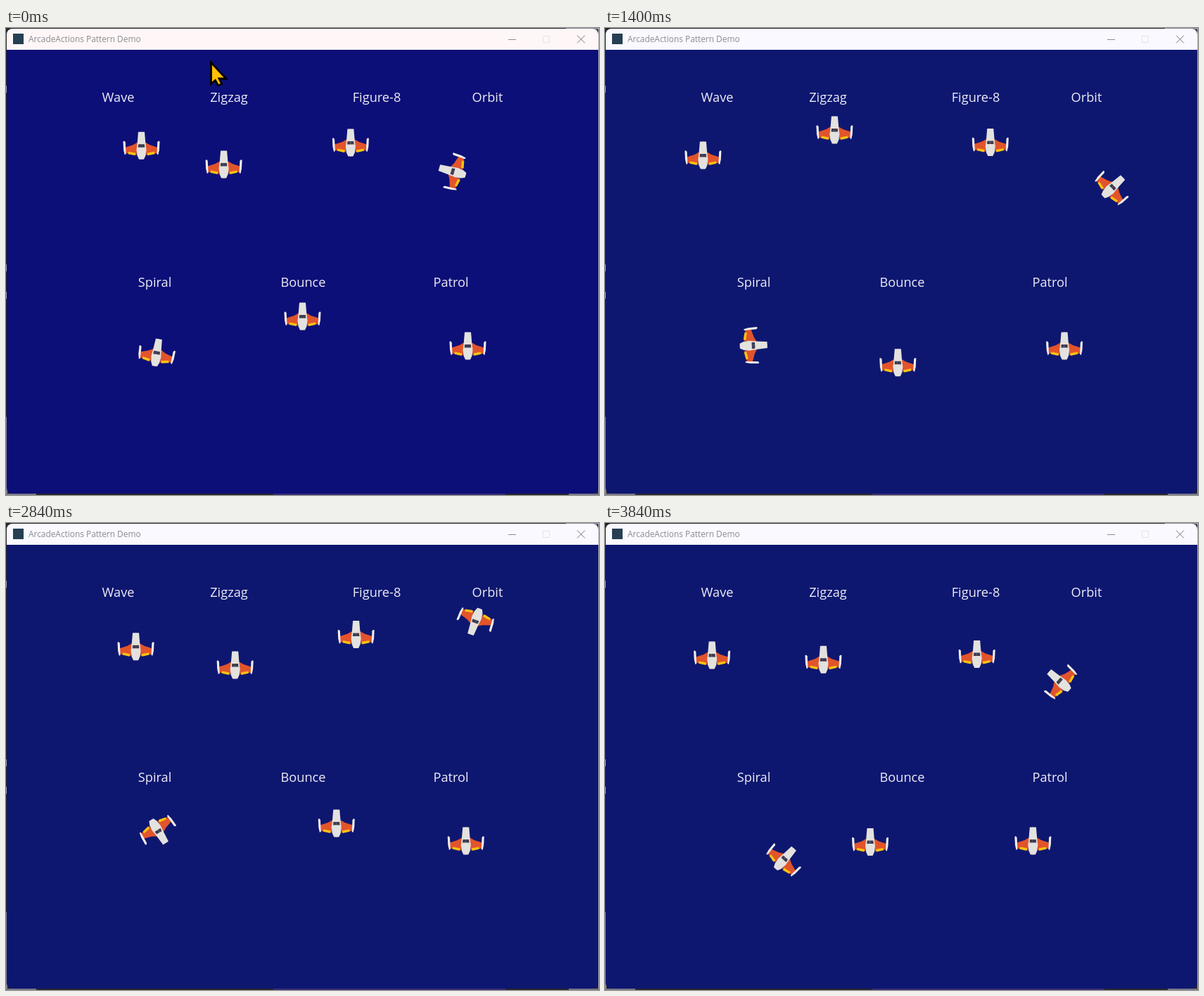
An HTML page with a canvas for the animation above (3880 ms loop, 843 by 664 pixels).

```html
<!DOCTYPE html>
<html lang="en">
<head>
<meta charset="utf-8">
<title>Pattern Demo</title>
<style>
  html, body { margin: 0; width: 100%; height: 100%; overflow: hidden; background: #222; }
  canvas { display: block; }
</style>
</head>
<body>
<canvas id="stage" width="843" height="664"></canvas>
<script>
const ctx = document.getElementById('stage').getContext('2d');
const LOOP = 3880;
const FONT = '"Open Sans", "Noto Sans", sans-serif';
const RAD = Math.PI / 180;
const { sin, cos, abs, atan2, max, PI } = Math;

// Back and forth between 0 and len
const ping = (s, len) => len - abs(s % (2 * len) - len);

// Distance flown after t seconds: the game picks up speed twice
const distance = t => 73.3 * t + 36.2 * max(0, t - 0.6) + 13.1 * max(0, t - 2);

function rect(color, x, y, w, h) {
  ctx.fillStyle = color;
  ctx.fillRect(x, y, w, h);
}

function trace(pts) {
  ctx.beginPath();
  for (let i = 0; i < pts.length; i += 2) ctx.lineTo(pts[i], pts[i + 1]);
}

function poly(color, ...pts) {
  trace(pts);
  ctx.closePath();
  ctx.fillStyle = color;
  ctx.fill();
}

function line(color, ...pts) {
  trace(pts);
  ctx.strokeStyle = color;
  ctx.lineWidth = 1;
  ctx.stroke();
}

function text(str, x, y, size, color, align) {
  ctx.font = `${size}px ${FONT}`;
  ctx.textAlign = align;
  ctx.fillStyle = color;
  ctx.fillText(str, x, y);
}

const label = (str, x, y) => text(str, x, y, 18.2, '#ececf4', 'center');

// Nose points up at angle 0; each half is drawn as a mirror image
function ship(x, y, angle = 0) {
  for (const side of [-1, 1]) {
    ctx.save();
    ctx.translate(x, y);
    ctx.rotate(angle * RAD);
    ctx.scale(side, 1);
    poly('#e2542b', 5, -5, 12, -1, 23, 2.5, 23, 10.5, 7, 13.5);
    poly('#f9c311', 8, 10.5, 18.5, 8.5, 19, 11.8, 9, 14);
    poly('#efefec', 22.8, -5, 24.5, -6.8, 26, -6, 25.4, 6, 23.8, 13, 22, 12);
    poly('#e3e2de', -0.5, -19.5, 4.5, -19.5, 5.8, -4, 7, 6, 6, 14, 3.5, 19.5, -0.5, 19.5);
    poly('#3d3c50', -0.5, -2, 4.3, -2, 4.8, 2.5, -0.5, 2.5);
    ctx.restore();
  }
}

function wave(d) {
  const x = ping(75.5 + 0.533 * d, 84);
  ship(117 + x, 157.5 + 31.5 * sin(PI * x / 84));
}

function zigzag(d) {
  const climb = ping(27 + 0.3715 * d, 78.75);
  ship(300.6 + ping(2 * climb, 31.5), 220.9 - climb);
}

function figureEight(d) {
  const a = (1.1416 * d - 119.6) * RAD;
  ship(526.4 + 42 * sin(a), 190 - 31.5 * sin(2 * a));
}

function orbit(d) {
  const a = (196 + 0.912 * d) * RAD;
  ship(684.7 + 52 * cos(a), 189.5 - 52.5 * sin(a), a / RAD + 90);
}

// Winds in to the centre, then back out, widening faster at the end
function spiral(d) {
  const s = abs(d - 119), turn = 2.16 * RAD;
  const widen = max(0, s - 215);
  const r = 0.083 * s + 0.0033 * widen ** 2;
  const slope = 0.083 + 0.0066 * widen;
  const a = 325.4 * RAD - turn * s;
  const facing = a + atan2(slope, r * turn);
  ship(210.7 + r * cos(a), 452.3 + r * sin(a), 90 - facing / RAD);
}

function bounce(d) {
  ship(358.7 + ping(62.8 + d, 126), 409.6 + ping(0.4 + d / 2, 84));
}

function patrol(d) {
  ship(589 + ping(100.5 + d, 84), 452);
}

function cursor() {
  trace([291.5, 49, 291.5, 79.5, 297.5, 74.5, 301.8, 82, 306.8, 79.5, 303, 72, 313, 72]);
  ctx.closePath();
  ctx.fillStyle = '#fdc005';
  ctx.fill();
  ctx.strokeStyle = '#000';
  ctx.lineWidth = 2.8;
  ctx.stroke();
}

function drawWindow(first) {
  rect('#26262b', 0, 0, 843, 664);
  rect('#8d8798', 796, 0, 47, 2);
  rect('#a9a9b2', 842, 0, 1, 664);
  rect('#85858f', 0, 553, 2, 111);
  for (const y of [82, 336, 375]) rect('#a0a0a4', 0, y, 1, 10);
  rect('#3a2c78', 380, 662, 330, 2);
  for (const x of [0, 800]) rect('#77758a', x, 662, 43, 2);

  ctx.save();
  ctx.beginPath();
  ctx.roundRect(1, 1, 841, 661, 8);
  ctx.clip();
  rect(first ? '#0d0f78' : '#0e1770', 0, 0, 843, 664);
  rect(first ? '#fff7f7' : '#f9f9ff', 0, 0, 843, 31);
  ctx.restore();

  rect('#263f52', 10, 8, 15, 15);
  text('ArcadeActions Pattern Demo', 32, 20, 11.9, '#8b8b90', 'left');
  line('#8a8a8f', 714, 16.5, 725, 16.5);
  line('#75757a', 812, 10.5, 823, 21.5);
  line('#75757a', 823, 10.5, 812, 21.5);
  ctx.strokeStyle = '#e4e4e9';
  ctx.strokeRect(763.5, 11.5, 9, 9);
}

function draw(ms) {
  drawWindow(ms < 40);

  label('Wave', 159.5, 105);
  label('Zigzag', 317, 105);
  label('Figure-8', 527, 105);
  label('Orbit', 684.5, 105);
  label('Spiral', 211.5, 368);
  label('Bounce', 422.5, 368);
  label('Patrol', 632.5, 368);

  const d = distance(ms / 1000);
  for (const move of [wave, zigzag, figureEight, orbit, spiral, bounce, patrol]) move(d);

  if (ms < 1000) cursor();
}

function tick() {
  const t = performance.now() % LOOP;
  draw(Math.floor(t / 40) * 40);
  requestAnimationFrame(tick);
}
tick();
</script>
</body>
</html>
```
